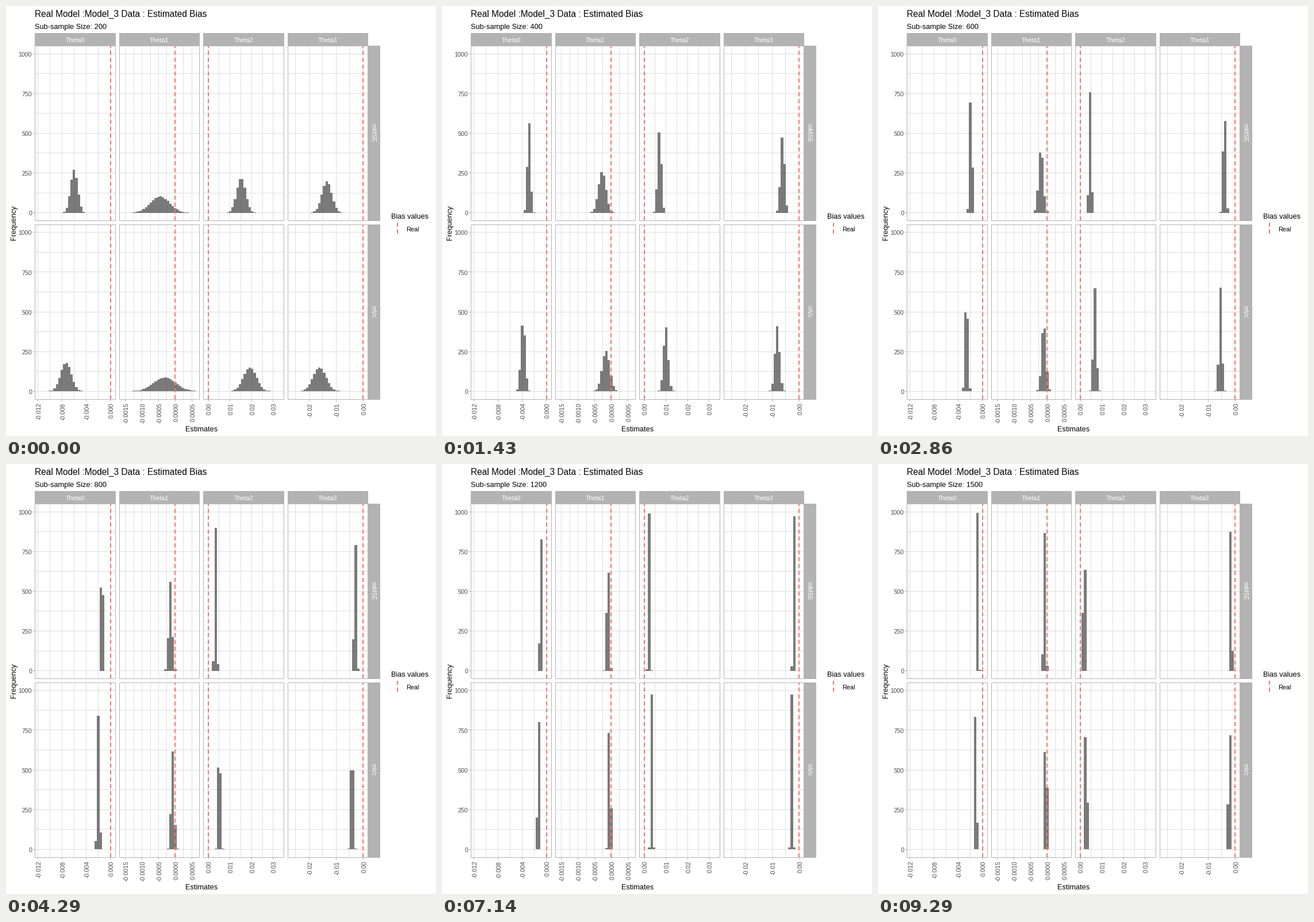
A matplotlib script for the animation above (10 s loop, 748x748 px).

```python
import math

import matplotlib.pyplot as plt
from matplotlib.animation import FuncAnimation
from matplotlib.collections import LineCollection, PolyCollection
from matplotlib.patches import Rectangle

SIDE, DPI = 748, 64
LOOP, STEP = 10000, 40
SIZES = range(200, 1600, 100)

GRID, EDGE, BAR, RED, TICK = "#DEDEDE", "#B3B3B3", "#595959", "#F8766D", "#4D4D4D"
BIG, MID, SMALL = 15.55, 12.8, 10.6

# Panel layout in pixels: 30 bins plus 5% padding on each side
LEFTS, WIDTH = [50.7 + 146.47 * c for c in range(4)], 139.5
TOPS, HEIGHT = (69.3, 380.0), 304.2
BIN = WIDTH / 33
UNIT = HEIGHT / 1100
ZERO_BIN = (29, 21, 0, 29)
ZERO_X = [x + WIDTH / 22 + (k + 0.5) * BIN for x, k in zip(LEFTS, ZERO_BIN)]
ZERO_Y = [y + HEIGHT * 21 / 22 for y in TOPS]

# Per column: pixels between labels, value step, decimals, label multiples
AXES = [
    (42.1, 0.004, 3, range(-3, 1)),
    (28.9, 0.0005, 4, range(-3, 2)),
    (37.6, 0.01, 2, range(0, 4)),
    (46.9, 0.01, 2, range(-2, 1)),
]

# Per row and column: bias and spread in bins times sample size, each as
# a limit and an extra part that fades with the size
ROWS = [
    [(-2755, -235, 205, 85), (-1710, 470, 430, 350),
     (2270, 430, 205, 150), (-2450, -530, 210, 190)],
    [(-4045, 385, 225, 215), (-860, 0, 300, 620),
     (3640, -220, 215, 315), (-3605, 25, 215, 315)],
]


def pt(px):
    return px * 72 / DPI


def cdf(x, mu, sd):
    return 0.5 * (1 + math.erf((x - mu) / (sd * math.sqrt(2))))


def histogram(row, col, n):
    """Pairs of bin number (0 is the bin at zero) and expected count."""
    bias, bias_extra, spread, spread_extra = ROWS[row][col]
    fade = SIZES[0] / n
    mu = (bias + bias_extra * fade) / n
    sd = (spread + spread_extra * fade) / n
    first = -ZERO_BIN[col]
    for k in range(first, first + 30):
        yield k, 1000 * (cdf(k + 0.5, mu, sd) - cdf(k - 0.5, mu, sd))


def bars(n):
    polys = []
    for row in range(2):
        base = round(ZERO_Y[row])
        for col in range(4):
            for k, count in histogram(row, col, n):
                if count < 1.5:
                    continue
                x0 = round(ZERO_X[col] + (k - 0.5) * BIN)
                x1 = round(ZERO_X[col] + (k + 0.5) * BIN)
                top = min(round(ZERO_Y[row] - count * UNIT), base - 1)
                polys.append([(x0, base), (x0, top), (x1, top), (x1, base)])
    return polys


fig = plt.figure(figsize=(SIDE / DPI, SIDE / DPI), dpi=DPI, facecolor="white")
ax = fig.add_axes([0, 0, 1, 1])
ax.set_xlim(0, SIDE)
ax.set_ylim(SIDE, 0)
ax.axis("off")


def text(x, y, s, size, color="black", ha="left", rot=0):
    return ax.text(x, y, s, fontsize=pt(size), color=color, ha=ha, va="baseline",
                   rotation=rot, rotation_mode="anchor", zorder=6,
                   family="Liberation Sans")


def mid(v):
    """Centre of the pixel that holds v."""
    return math.floor(v) + 0.5


def hline(y, x0, x1):
    return [(math.floor(x0), mid(y)), (math.floor(x1), mid(y))]


def vline(x, y0, y1):
    return [(mid(x), math.floor(y0)), (mid(x), math.floor(y1))]


def add_lines(segments, color, z):
    ax.add_collection(LineCollection(segments, colors=color, linewidths=pt(1),
                                     zorder=z, snap=False), autolim=False)


def dashed(x, bottom, top):
    ax.plot([round(x)] * 2, [bottom, top], color=RED, lw=pt(2),
            ls=(0, (3.5, 2.5)), zorder=4, snap=False)


def box(x0, y0, x1, y1, **style):
    ax.add_patch(Rectangle((x0, y0), x1 - x0, y1 - y0, zorder=5, snap=False, **style))


grid, ticks = [], []


def panel(row, col):
    x0, y0 = LEFTS[col], TOPS[row]
    x1, y1 = x0 + WIDTH, y0 + HEIGHT
    for count in range(0, 1001, 125):
        grid.append(hline(ZERO_Y[row] - count * UNIT, x0, x1))
    for i in range(-8, 9):
        x = ZERO_X[col] + i * AXES[col][0] / 2
        if x0 + 1 < x < x1 - 1:
            grid.append(vline(x, y0, y1))
    dashed(ZERO_X[col], math.floor(y1), math.floor(y0))
    box(mid(x0), mid(y0), mid(x1), mid(y1), fill=False, ec=EDGE, lw=pt(1))


for r in range(2):
    for c in range(4):
        panel(r, c)

for c, (gap, step, places, marks) in enumerate(AXES):
    x = LEFTS[c]
    box(math.floor(x), 47, math.floor(x + WIDTH) + 1, 69, fc=EDGE, lw=0)
    text(x + WIDTH / 2, 63, f"Theta{c}", SMALL, "white", "center")
    for m in marks:
        tx = ZERO_X[c] + m * gap
        ticks.append(vline(tx, 685, 688))
        text(tx + 5, 690.5, f"{m * step:.{places}f}", SMALL, TICK, "right", 90)

for r, name in enumerate(("mMSE", "mVc")):
    y = TOPS[r]
    box(629, math.floor(y), 651, math.floor(y + HEIGHT) + 1, fc=EDGE, lw=0)
    text(635.5, y + HEIGHT / 2, name, SMALL, "white", "center", -90)
    for count in range(0, 1001, 250):
        ty = ZERO_Y[r] - count * UNIT
        ticks.append(hline(ty, 47, 50))
        text(45.2, ty + 4.6, str(count), SMALL, TICK, "right")

add_lines(grid, GRID, 1)
add_lines(ticks, EDGE, 2)

text(50.3, 19, "Real Model :Model_3 Data : Estimated Bias", BIG)
subtitle = text(50.3, 39.5, "", MID)
text(340, 740, "Estimates", MID, ha="center")
text(17, 376.5, "Frequency", MID, ha="center", rot=90)
text(670, 370, "Bias values", MID)
text(696, 391.5, "Real", SMALL + 0.3)
dashed(680.6, 396, 376)

hist = PolyCollection([], facecolors=BAR, alpha=0.8, linewidths=0,
                      antialiaseds=False, zorder=3)
ax.add_collection(hist, autolim=False)


def update(i):
    # The size that is due by the end of this step
    end = (i + 1) * STEP - 1
    n = SIZES[end * len(SIZES) // LOOP]
    hist.set_verts(bars(n))
    subtitle.set_text(f"Sub-sample Size: {n}")
    return hist, subtitle


def reset():
    return update(0)


anim = FuncAnimation(fig, update, frames=LOOP // STEP, init_func=reset,
                     interval=STEP, repeat=True, repeat_delay=0)
plt.show()
```
